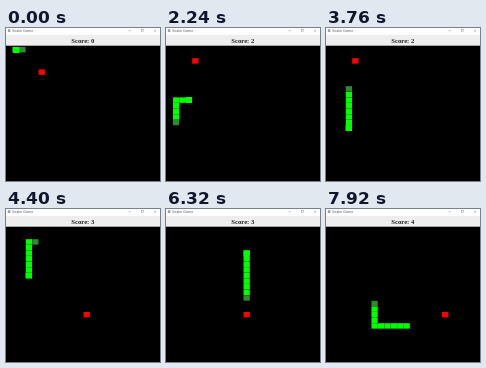
Recreate the animation shown at these times as an HTML page. Size 154x153 px, loop 8 s.

```html
<!DOCTYPE html>
<html lang="en">
<head>
<meta charset="utf-8">
<title>Snake Game</title>
<style>
  html, body { margin: 0; width: 100%; height: 100%; overflow: hidden; background: #000; }
  svg { display: block; width: 100%; height: 100%; }
  .caption { font: 3.7px "Open Sans", "Noto Sans", sans-serif; fill: #555; }
  .score { font: bold 6.7px "Liberation Serif", "Noto Serif", serif; fill: #222; text-anchor: middle; }
</style>
</head>
<body>
<svg viewBox="0 0 154 153">
  <rect width="154" height="153" fill="#000"/>
  <rect width="154" height="7" fill="#fff"/>
  <rect y="6.8" width="154" height="10.9" fill="#eee"/>
  <rect x="1.9" y="1.3" width="2.4" height="2.6" fill="#8a9bb0"/>
  <text class="caption" x="5.9" y="4.1">Snake Game</text>
  <g fill="none" stroke="#777" stroke-width=".4">
    <path d="M122.5 2.7h2.4M147.9 1.6l2.3 2.2M150.2 1.6l-2.3 2.2"/>
    <rect x="135.3" y="1.6" width="2.2" height="2.1"/>
  </g>
  <text class="score" id="score" x="76.8" y="14.6">Score: 0</text>
  <g id="board"></g>
</svg>
<script>
const LOOP = 8000, TICK = 80;
const CELL_W = 6.42, CELL_H = 5.6, LEFT = 0.5, TOP = 19;
const START_LENGTH = 6;
const STEP = { R: [1, 0], L: [-1, 0], U: [0, -1], D: [0, 1] };
const ROUTE = "R3 D9 L4 D7 R2 U14 R9 D15 L5 U4";
const FOODS = [[5, 4], [1, 13], [4, 2], [12, 15], [18, 15]];
// Game pace as [move, ms] pairs, linear in between.
const PACE = [[0, -20], [23, 2487], [30, 3195], [31, 3344], [73, 7925]];

const board = document.getElementById("board");
const scoreLabel = document.getElementById("score");

const path = [[2, 0]];
for (const leg of ROUTE.split(" ")) {
  const [dx, dy] = STEP[leg[0]];
  for (let n = +leg.slice(1); n > 0; n--) {
    const [x, y] = path[path.length - 1];
    path.push([x + dx, y + dy]);
  }
}
const cellAt = move => move < 0 ? [1, 0] : path[move];

// The move on which each food is reached.
const meals = FOODS.map(([x, y]) => path.findIndex(p => p[0] === x && p[1] === y))
  .filter(move => move >= 0);

function makeCell(color) {
  const cell = document.createElementNS("http://www.w3.org/2000/svg", "rect");
  cell.setAttribute("width", CELL_W - 0.15);
  cell.setAttribute("height", CELL_H - 0.15);
  cell.setAttribute("fill", color);
  return board.appendChild(cell);
}

function place(cell, [col, row]) {
  cell.setAttribute("x", LEFT + col * CELL_W);
  cell.setAttribute("y", TOP + row * CELL_H);
}

const food = makeCell("#f00");
const body = Array.from({ length: START_LENGTH + meals.length - 1 }, () => makeCell("#0f0"));
const head = makeCell("#2d8c2d");

function moveAt(time) {
  const i = PACE.findIndex(([, ms]) => ms > time);
  if (i < 0) return path.length - 1;
  const [n0, t0] = PACE[i - 1], [n1, t1] = PACE[i];
  const move = Math.floor(n0 + (n1 - n0) * (time - t0) / (t1 - t0));
  return Math.min(move, path.length - 1);
}

function draw(time) {
  const move = moveAt(time);
  const score = meals.filter(m => m <= move).length;
  // A meal lengthens the snake on the following move.
  const length = START_LENGTH + meals.filter(m => m < move).length;

  scoreLabel.textContent = "Score: " + score;
  place(food, FOODS[score]);
  place(head, cellAt(move));
  body.forEach((cell, i) => place(cell, cellAt(move - Math.min(i + 1, length - 1))));
}

function frame(now) {
  draw(Math.floor(now % LOOP / TICK) * TICK);
  requestAnimationFrame(frame);
}
draw(0);
requestAnimationFrame(frame);
</script>
</body>
</html>
```
